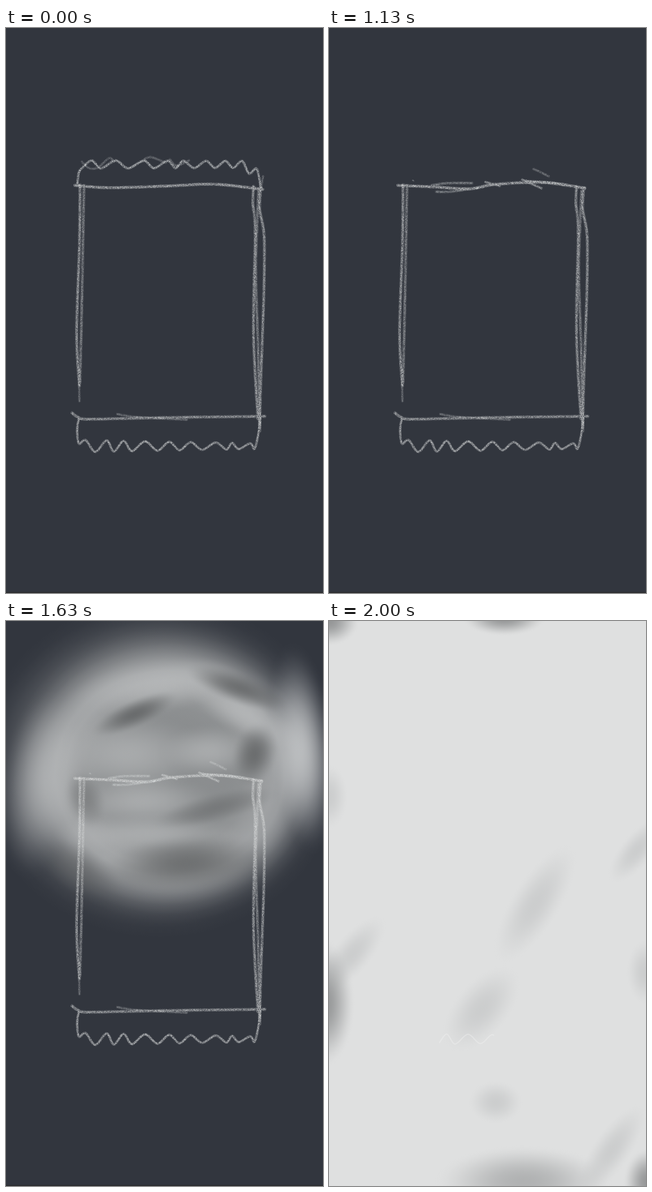
These frames come from a looping animation (561x998 px, 2.12 s). An HTML page with a canvas:

```html
<!DOCTYPE html>
<html lang="en">
<head>
<meta charset="utf-8">
<title>Chalk wrapper</title>
<style>
  html, body { margin: 0; width: 100%; height: 100%; overflow: hidden; background: #32363e; }
  canvas { display: block; width: 100%; height: 100%; }
</style>
</head>
<body>
<canvas id="stage" width="561" height="998"></canvas>
<script>
const W = 561, H = 998, LOOP = 2120, STEPS = 17;
const LEFT = 125, HINGE = 446, BASE = 279;
const stage = document.getElementById('stage').getContext('2d');

function layer() {
  const c = document.createElement('canvas');
  c.width = W;
  c.height = H;
  return c.getContext('2d');
}

// Seeded speckle that is cut out of every chalk layer.
const grain = (() => {
  const g = layer(), img = g.createImageData(W, H);
  let seed = 7;
  for (let i = 3; i < img.data.length; i += 4) {
    seed = (seed * 1664525 + 1013904223) >>> 0;
    img.data[i] = 205 * (seed / 2 ** 32);
  }
  g.putImageData(img, 0, 0);
  return g.canvas;
})();

// ---- Chalk ----
// Alternating crests and troughs at the given x, with a changing height.
const wave = (mid, from, to, xs) => xs.flatMap((x, i) =>
  [x, mid + (i % 2 ? 1 : -1) * (from + (to - from) * i / (xs.length - 1))]);

const bottomTeeth = [129, 690, 126, 708, 129, 734,
  ...wave(738.5, 10.5, 4.5, [141, 158, 178, 191, 208, 223, 246, 268, 289, 307, 327, 347, 371, 390, 400, 412, 432, 440]),
  447, 715, 450, 690];
const topTeeth = [126, 278, 129, 255, 136, 246,
  ...wave(241, 7, 6, [152, 168, 194, 216, 244, 262, 286, 300, 314, 333, 354, 370, 388, 402, 418]),
  430, 257, 444, 249, 451, 284];
const topGhosts = [
  [134, 236, 146, 247, 162, 247, 182, 230, 191, 236],
  [240, 236, 255, 228, 283, 238],
  [290, 232, 302, 243, 324, 234],
  [455, 262, 451, 286]
];
const flapTeeth = [221, 66, 250, 55, 276, 49, 278, 62, 273, 91, 297, 81, 304, 121, 336, 130, 347, 170,
  374, 167, 378, 204, 400, 196, 407, 227, 429, 227, 434, 262, 454, 257, 450, 282];
const flapFold = [221, 65, 237, 98, 262, 140, 295, 178, 340, 212, 395, 253, 442, 281];

function trace(g, p) {
  const last = p.length / 2 - 1;
  const at = i => {
    const k = 2 * Math.max(0, Math.min(last, i));
    return [p[k], p[k + 1]];
  };
  g.beginPath();
  g.moveTo(p[0], p[1]);
  for (let i = 0; i < last; i++) {
    const [a, b, c, d] = [at(i - 1), at(i), at(i + 1), at(i + 2)];
    g.bezierCurveTo(b[0] + (c[0] - a[0]) / 6, b[1] + (c[1] - a[1]) / 6,
                    c[0] - (d[0] - b[0]) / 6, c[1] - (d[1] - b[1]) / 6, c[0], c[1]);
  }
}

function chalk(g, strength, width, ...lines) {
  g.lineCap = g.lineJoin = 'round';
  for (const line of lines) {
    trace(g, line);
    g.lineWidth = width * 1.2;
    g.strokeStyle = `rgba(222,224,224,${strength * .4})`;
    g.stroke();
    g.lineWidth = width * .7;
    g.strokeStyle = `rgba(222,224,224,${strength * .8})`;
    g.stroke();
  }
}

function within(g, x0, x1, draw) {
  g.save();
  g.beginPath();
  g.rect(x0, 0, x1 - x0, H);
  g.clip();
  draw(g);
  g.restore();
}

function drawBox(g) {
  chalk(g, .75, 5,
    [131, 277, 130, 380, 125, 540, 130, 632],
    [438, 280, 437, 312, 441, 360, 438, 540, 446, 690],
    [451, 282, 449, 320, 457, 370, 456, 480, 451, 620, 449, 705],
    [117, 680, 127, 687, 150, 691, 290, 688, 458, 686]);
  chalk(g, .55, 5,
    [138, 278, 134, 500, 131, 625],
    [447, 288, 442, 420, 446, 560, 449, 712]);
  chalk(g, .4, 4, [129, 600, 130, 659], [197, 682, 230, 687, 320, 692]);
  chalk(g, .9, 4, bottomTeeth);
}

function drawSealedLine(g) {
  chalk(g, .9, 5, [122, 278, 180, 282, 290, 279, 370, 276, 454, 285]);
}

function drawTornLine(g) {
  chalk(g, .9, 5, [122, 278, 190, 281, 250, 284, 295, 276, 380, 273, 453, 283]);
  chalk(g, .52, 4.5, [182, 278, 210, 274, 253, 274], [190, 289, 215, 289, 272, 281]);
  chalk(g, .78, 4, [277, 272, 302, 279], [342, 268, 376, 283], [348, 270, 392, 273, 420, 277]);
  chalk(g, .7, 2, [148, 269, 150, 270]);
}

function drawFlap(g) {
  chalk(g, .8, 4, flapTeeth);
  chalk(g, .85, 5, flapFold);
  chalk(g, .75, 6, [234, 92, 258, 135, 293, 178]);
  chalk(g, .7, 4, [300, 180, 345, 213, 386, 243]);
  chalk(g, .45, 5, [298, 182, 330, 218, 395, 260]);
}

function drawCrumbs(g) {
  chalk(g, .9, 2, [304, 245, 310, 242], [257, 95, 260, 96], [282, 121, 284, 122],
    [235, 188, 236, 189], [374, 231, 376, 232]);
}

// Bends everything left of the tear upwards along the flap's curve.
function peel(points, tear) {
  const out = [];
  for (let i = 0; i < points.length; i += 2) {
    let x = points[i], y = points[i + 1];
    if (x < tear) {
      const reach = tear - x, rise = BASE - y;
      let angle = 0;
      x = tear;
      y = BASE;
      for (let s = 0; s < reach; s += 4) {
        angle = (30 + 35 * (s / 320) ** 1.3) * Math.PI / 180;
        const d = Math.min(4, reach - s);
        x -= d * Math.cos(angle);
        y -= d * Math.sin(angle);
      }
      x += rise * Math.sin(angle);
      y -= rise * Math.cos(angle);
    }
    out.push(x, y);
  }
  return out;
}

function drawTearing(g, step) {
  const tear = LEFT + (HINGE - LEFT) * step / 5;
  const split = step ? tear : 0;
  within(g, 0, split, drawTornLine);
  within(g, split, W, drawSealedLine);
  chalk(g, .88, 4.2, peel(topTeeth, tear));
  chalk(g, .35, 4, ...topGhosts.map(p => peel(p, tear)));
  if (step) {
    const fold = [];
    for (let x = LEFT; x < tear; x += 16) fold.push(x, BASE);
    chalk(g, .85, 5, peel([...fold, tear, BASE], tear));
  }
}

function drawChalk(g, step) {
  drawBox(g);
  if (step < 5) return drawTearing(g, step);
  drawTornLine(g);
  if (step === 5) {
    drawFlap(g);
    drawCrumbs(g);
    return;
  }
  chalk(g, .42, 4, [362, 249, 375, 255, 389, 262]);
  if (step < 9) {
    const k = step - 5;
    g.save();
    g.translate(-4 * k, -32 * k - 13 * k * k);
    drawFlap(g);
    g.restore();
  }
}

// ---- Smoke: soft ellipses, opacity given by a falloff from centre to rim ----
const soft = r => (1 - r * r) ** 2;
const disc = r => {
  const u = Math.min(1, (1 - r) / .48);
  return u * u * (3 - 2 * u);
};
const ring = r => Math.exp(-(((r - .67) / .15) ** 2)) * (1 - r ** 8);

function cloud(g, falloff, tone, alpha, [x, y, rx, ry, turn = 0]) {
  g.save();
  g.translate(x, y);
  g.rotate(turn * Math.PI / 180);
  g.scale(rx, ry);
  const fill = g.createRadialGradient(0, 0, 0, 0, 0, 1);
  for (let i = 0; i <= 16; i++) {
    fill.addColorStop(i / 16, `rgba(${tone},${tone + 2},${tone + 3},${falloff(i / 16) * alpha})`);
  }
  g.fillStyle = fill;
  g.fillRect(-1, -1, 2, 2);
  g.restore();
}
const smudge = (g, tone, alpha, ...spots) => spots.forEach(s => cloud(g, soft, tone, alpha, s));

function puff(g) {
  cloud(g, disc, 175, .8, [270, 255, 205, 128]);
  cloud(g, ring, 190, .3, [275, 258, 185, 100]);
  smudge(g, 115, .4, [290, 260, 130, 34]);
  smudge(g, 140, .28, [110, 290, 55, 75], [474, 262, 48, 88]);
  smudge(g, 50, .3, [453, 255, 18, 45]);
}

function bloom(g) {
  cloud(g, disc, 165, .75, [275, 262, 275, 205]);
  cloud(g, ring, 195, .35, [280, 262, 265, 190]);
  smudge(g, 185, .4, [270, 255, 190, 110]);
  smudge(g, 98, .4, [350, 335, 120, 28, -8], [440, 240, 40, 60]);
}

function swirl(g) {
  cloud(g, disc, 150, .62, [285, 265, 275, 270]);
  cloud(g, ring, 205, .45, [290, 270, 295, 265]);
  smudge(g, 218, .7, [525, 225, 62, 190, -6]);
  smudge(g, 196, .5, [60, 290, 75, 170, 8], [275, 115, 160, 50, -8], [420, 165, 120, 40, 28],
    [215, 235, 150, 75], [360, 230, 90, 50], [240, 318, 140, 50], [250, 375, 170, 40]);
  smudge(g, 90, .7, [410, 118, 100, 30, 20], [228, 164, 85, 26, -24], [440, 235, 42, 60, 15],
    [320, 430, 165, 55, -5]);
  smudge(g, 95, .45, [370, 330, 120, 28, -14], [140, 315, 38, 55, -20], [130, 440, 90, 45, 30]);
}

function spread(g, full) {
  const veil = g.createLinearGradient(0, 0, 0, H);
  const [solid, gone] = full ? [.86, .985] : [.55, .78];
  for (let i = 0; i <= 8; i++) {
    const k = i / 8;
    veil.addColorStop(solid + (gone - solid) * k, `rgba(155,157,159,${.85 * (1 - k * k * (3 - 2 * k))})`);
  }
  g.fillStyle = veil;
  g.fillRect(0, 0, W, H);
  smudge(g, 198, .5, [40, 60, 140, 150, 40], [540, 130, 60, 110], [490, 40, 110, 55], [280, 15, 130, 35]);
  cloud(g, ring, 85, .7, [285, 272, 350, 320]);
  smudge(g, 205, .75, [60, 460, 130, 80, 25], [490, 555, 170, 95, -18], [310, 605, 125, 85], [90, 630, 120, 80]);
  smudge(g, 102, .45, [20, 560, 70, 60], [270, 545, 70, 30]);
  if (!full) return;
  smudge(g, 95, .65, [430, 715, 230, 60, -5], [250, 712, 170, 42], [545, 640, 90, 60]);
  smudge(g, 200, .74, [90, 800, 210, 100, 10], [470, 830, 210, 115], [270, 880, 240, 105]);
  smudge(g, 118, .75, [330, 850, 80, 32]);
  smudge(g, 48, .9, [0, 950, 150, 105, 20], [280, 1000, 420, 62]);
}

function whiteout(g) {
  g.fillStyle = '#dfe0e0';
  g.fillRect(0, 0, W, H);
  smudge(g, 110, .65, [0, 0, 55, 45], [310, -5, 75, 32], [-8, 675, 55, 115], [565, 990, 45, 60]);
  smudge(g, 145, .6, [345, 990, 160, 65]);
  smudge(g, 170, .36, [40, 590, 90, 35, -50], [0, 310, 35, 60], [365, 500, 125, 45, -58],
    [270, 685, 95, 50, -50], [295, 850, 50, 40], [545, 405, 75, 30, -50], [560, 620, 35, 60],
    [500, 935, 100, 35, -55]);
  within(g, 195, 292, () => {
    g.lineWidth = 2;
    g.strokeStyle = 'rgba(240,241,241,.4)';
    trace(g, bottomTeeth);
    g.stroke();
  });
}

function render(step) {
  const g = layer();
  g.fillStyle = '#32363e';
  g.fillRect(0, 0, W, H);
  g.fillStyle = '#2c2d30';
  g.fillRect(0, H - 2, W, 2);
  if (step === 16) {
    whiteout(g);
    return g.canvas;
  }
  if (step === 10) cloud(g, soft, 165, .55, [300, 262, 105, 46]);
  if (step === 11) puff(g);
  if (step === 12) bloom(g);
  if (step === 13) cloud(g, disc, 148, .72, [270, 260, 325, 300]);
  if (step > 13) spread(g, step === 15);
  if (step > 12) swirl(g);

  const lines = layer();
  drawChalk(lines, step);
  lines.globalCompositeOperation = 'destination-out';
  lines.drawImage(grain, 0, 0);
  g.drawImage(lines.canvas, 0, 0);
  return g.canvas;
}

const pictures = Array.from({ length: STEPS }, (_, i) => render(i));
const starts = pictures.map((_, i) => Math.round(i * 12.5) * 10);
let origin;

function play(now) {
  origin ??= now;
  const t = (now - origin) % LOOP;
  stage.drawImage(pictures[starts.filter(s => s <= t).length - 1], 0, 0);
  requestAnimationFrame(play);
}
stage.drawImage(pictures[0], 0, 0);
requestAnimationFrame(play);
</script>
</body>
</html>
```
